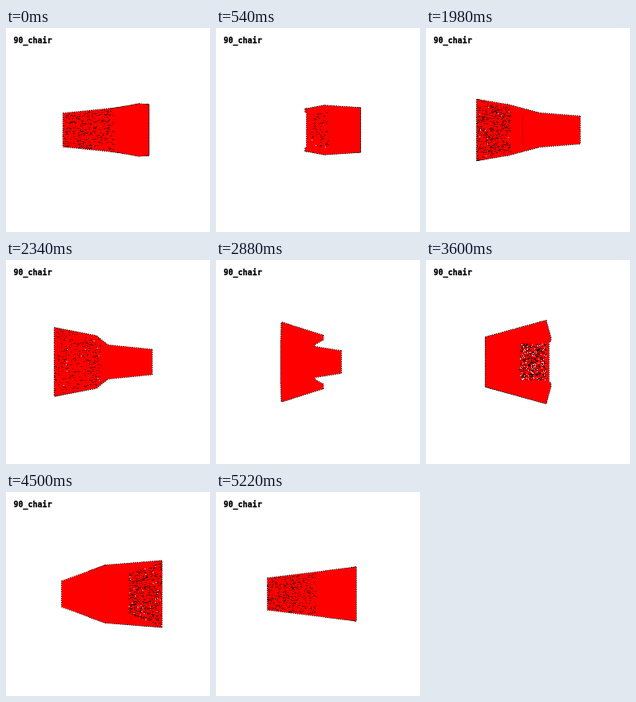
These frames come from a looping animation (256 by 256 pixels, 5400 ms). An HTML page with a canvas:

```html
<!DOCTYPE html>
<html>
<head>
<meta charset="utf-8">
<style>
html, body { margin: 0; width: 100%; height: 100%; overflow: hidden; background: #fff; }
canvas { display: block; }
</style>
</head>
<body>
<canvas id="stage" width="256" height="256"></canvas>
<script>
const ctx = document.getElementById('stage').getContext('2d');
const LOOP = 5400, STEPS = 30, FOCAL = 246, MID = 128;

// Profile points of the chair: [x, z, half width]
const head = [-0.187, 0.184, 0.0695];
const knee = [0.065, 0.14, 0.1];
const kneeIn = [0.065, 0.14, 0.06];
const heel = [0.183, 0.12, 0.114];
const toe = [0.187, -0.187, 0.1575];
const arm = [0.003, -0.127, 0.119];
const armIn = [0.003, -0.127, 0.099];
const lip = [0.043, -0.135, 0.125];

// Strips span both sides; walls are drawn once per side
const strips = [[head, heel], [heel, toe], [toe, lip]];
const walls = [[heel, toe, arm, knee], [arm, armIn, kneeIn, knee]];

// Sparse areas: ends, viewing angle, angular reach, dots, share of white
const patches = [
  { a: head, b: [0.025, 0.147, 0.094], at: 354, reach: 38, n: 320, white: 0 },
  { a: [0.03, -0.105, 0.09], b: [0.03, 0.045, 0.09], at: 72, reach: 40, n: 340, white: 0.04 },
  { a: toe, b: [-0.02, -0.125, 0.1], at: 130, reach: 38, n: 430, white: 0.04 },
  { a: [0.094, -0.01, 0.085], b: [0.032, -0.117, 0.085], at: 240, reach: 34, n: 600, white: 0.2 },
  { a: toe, b: [0.184, 0.003, 0.085], at: 302, reach: 34, n: 500, white: 0.08 }
];

function rng(seed) {
  return () => {
    seed = (seed * 1664525 + 1013904223) >>> 0;
    return seed / 4294967296;
  };
}

function project([x, z, w], angle, side) {
  const c = Math.cos(angle), s = Math.sin(angle);
  const k = FOCAL / (1 - z * c + x * s);
  return [MID + (x * c + z * s) * k, MID + side * w * k];
}

function polygon(points) {
  const path = new Path2D();
  points.forEach(p => path.lineTo(p[0], p[1]));
  path.closePath();
  return path;
}

function buildPaths(angle) {
  const paths = strips.map(([a, b]) => polygon([
    project(a, angle, -1), project(b, angle, -1),
    project(b, angle, 1), project(a, angle, 1)
  ]));
  for (const wall of walls)
    for (const side of [-1, 1])
      paths.push(polygon(wall.map(p => project(p, angle, side))));
  return paths;
}

function speckle(patch, index, degrees, angle) {
  const gap = Math.abs((degrees - patch.at + 540) % 360 - 180);
  const strength = Math.min(1, 2 * (1 - gap / patch.reach));
  if (strength <= 0) return;
  const rand = rng(index * 977 + Math.round(degrees) * 31 + 5);
  for (let i = 0; i < patch.n * strength; i++) {
    const t = rand(), v = rand() * 2 - 1;
    const p = patch.a.map((n, j) => n + (patch.b[j] - n) * t);
    const [x, y] = project(p, angle, v);
    ctx.fillStyle = rand() < patch.white ? '#fff' : '#000';
    ctx.fillRect(Math.floor(x), Math.floor(y), 1, 1);
  }
}

function draw(time) {
  const step = Math.floor(time % LOOP / LOOP * STEPS);
  const degrees = step * 360 / STEPS, angle = degrees * Math.PI / 180;
  ctx.fillStyle = '#fff';
  ctx.fillRect(0, 0, 256, 256);

  ctx.lineJoin = 'bevel';
  ctx.fillStyle = ctx.strokeStyle = '#000';
  ctx.font = 'bold 10px "DejaVu Sans Mono", monospace';
  ctx.lineWidth = 0.35;
  ctx.fillText('90_chair', 9.5, 19);
  ctx.strokeText('90_chair', 9.5, 19);

  const paths = buildPaths(angle);
  ctx.lineWidth = 1.5;
  ctx.setLineDash([1.5, 1.2]);
  paths.forEach(p => ctx.stroke(p));
  ctx.setLineDash([]);
  ctx.fillStyle = '#f00';
  paths.forEach(p => ctx.fill(p));
  patches.forEach((p, i) => speckle(p, i, degrees, angle));
}

let start = null;
function tick(now) {
  if (start === null) start = now;
  draw(Math.max(0, now - start));
  requestAnimationFrame(tick);
}
draw(0);
requestAnimationFrame(tick);
</script>
</body>
</html>
```
